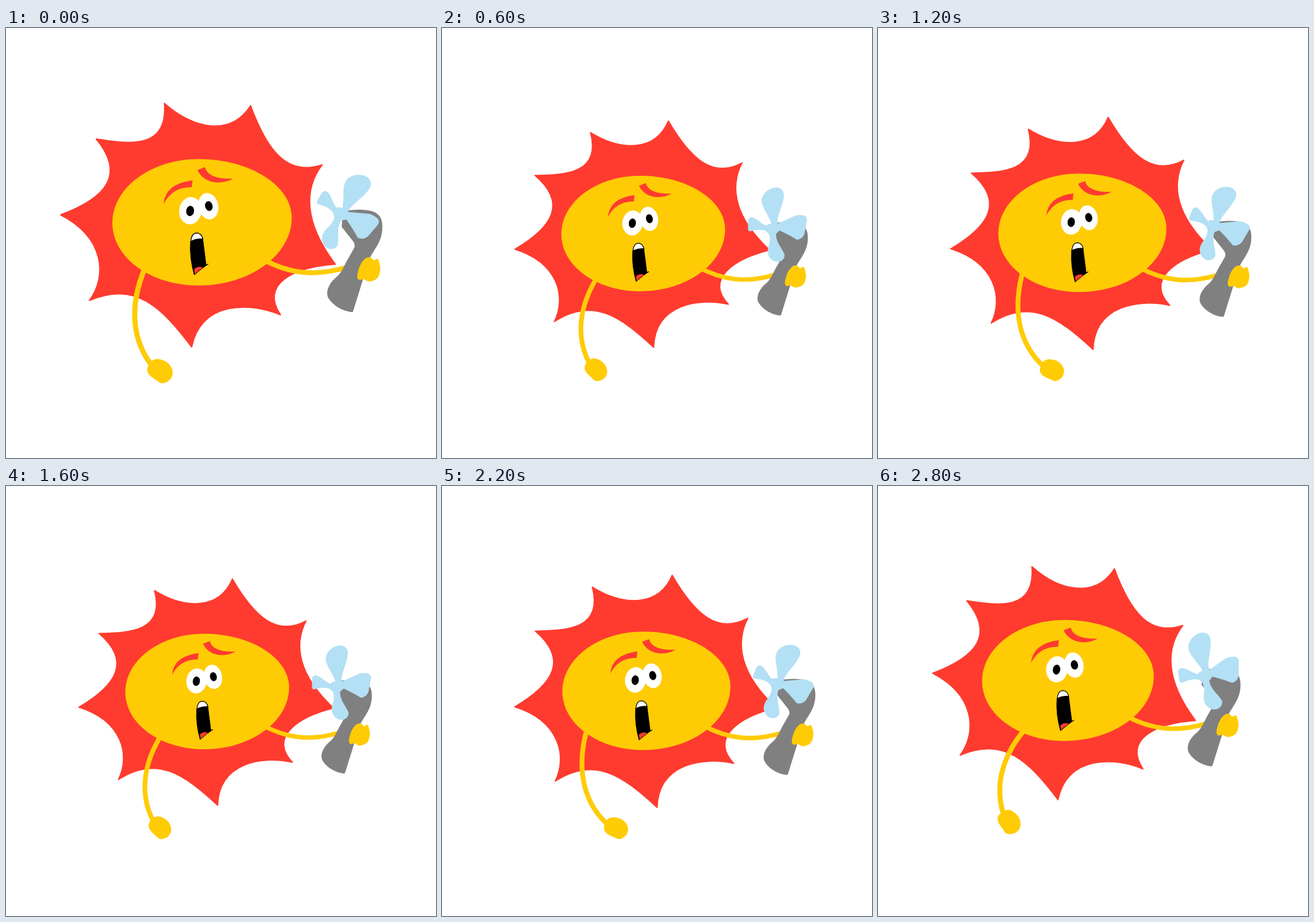
Animation of 748 by 748 pixels, one loop 3010 ms. Source, as an HTML page with a canvas:

```html
<!DOCTYPE html>
<html lang="en">
<head>
<meta charset="utf-8">
<title>Hot sun with a fan</title>
<style>
  html, body { margin: 0; width: 100%; height: 100%; overflow: hidden; background: #fff; }
  canvas { display: block; width: 100vw; height: 100vh; object-fit: contain; }
</style>
</head>
<body>
<canvas id="stage" width="748" height="748"></canvas>
<script>
const ctx = document.getElementById('stage').getContext('2d');
const LOOP = 3010, STEP = 200;
const RED = '#ff3b2f', YELLOW = '#ffcb05', GREY = '#808080', BLUE = '#b3e0f5';
const CENTER = [341, 338], ARM_PIVOT = [255, 500], FAN_PIVOT = [595, 316];

// x, y and size of the whole figure, then turns of rays and left arm in degrees
const poses = [
  { x: 341, y: 338, size: 1, rays: 0, arm: 0 },
  { x: 355.5, y: 356.2, size: 0.937, rays: -10, arm: -10 },
  { x: 351.6, y: 356.4, size: 0.921, rays: -10, arm: 0 },
  { x: 350, y: 357.5, size: 0.913, rays: -10, arm: 10 },
  { x: 330.4, y: 338.2, size: 0.957, rays: 0, arm: 20 }
];

const rays = new Path2D(`M275.5 131 C325 175 390 190 425.5 135
  C455 215 490 258 550 238 C518 280 518 338 573 411
  C500 416 442 445 477.5 499 C425 477 340 474 323 555
  C270 485 225 440 145 474 C176 432 172 365 95 325
  C175 295 208 255 157 193 C215 202 282 212 275.5 131 Z`);
const face = new Path2D(`M185 339 C185 278 252 228 335 228 C424 228 497 274 497 330
  C497 395 424 448 335 448 C252 448 185 400 185 339 Z`);
const brows = new Path2D(`M274 306 Q277 271 324.5 265 L323 277 Q290 276 274 306 Z
  M333 247 L346 242 C350 257 368 263 395 262 C372 275 343 269 333 247 Z`);
const mouth = new Path2D(`M321 371 Q331 365 342 365 L348 412 L352 410.5
  Q342 417 327.5 429.5 Q319 400 321 371 Z`);
const tooth = new Path2D('M321.5 371 Q323 356.5 332 356.5 Q340 357 342.5 367 Q331 366 321.5 371 Z');
const tongue = new Path2D('M327 420 Q334 413 342.5 417 Q335 422 328.5 428 Z');
const leftArm = new Path2D('M249 402 C215 470 215 535 252 585');
const rightArm = new Path2D('M446 402 C490 426 535 434 594 416');
const handle = new Path2D(`M586 319 C605 315 625 315 638 319 C652 324 656 335 654.5 352
  C652 375 640 385 632 402 L604 492 Q603.5 495 600 494 C585 492 569 483 561 470
  C555 459 562 444 574 434 C584 426 588 414 593 405 L606 382 Q608 376 603 370
  L584 346 Z`);
const blades = new Path2D(`M585 314 C589 295 584 276 592 265 C600 255 615 253 626 258
  C636 263 637 273 632 280 C620 297 601 306 595 320
  L629 323 Q636 323 646 331 Q651 336 647 342 L630 362 Q622 369 612 365
  Q604 350 592 333 L583 335
  C574 350 580 365 577 378 C572 387 561 386 555 380 C546 368 550 358 557 350
  C565 343 569 338 571 329 L569 321
  C562 312 552 309 542 306 Q539 304 542 299 L550 286 Q555 281 560 286
  C567 293 568 305 575 313 Q580 310 585 314 Z`);
const leftHand = blob([[246, 592], [254, 579], [266, 576], [282, 583], [290, 598],
  [285, 612], [272, 618], [262, 613], [249, 603]]);
const rightHand = blob([[611, 431], [616, 413], [625, 401], [634, 399], [640, 404],
  [647, 402], [651, 419], [646, 435], [632, 441], [622, 437], [614, 438]]);

// closed smooth curve through the points
function blob(pts) {
  const path = new Path2D(), n = pts.length;
  const at = i => pts[(i + n) % n];
  path.moveTo(...pts[0]);
  for (let i = 0; i < n; i++) {
    const [a, b, c, d] = [at(i - 1), at(i), at(i + 1), at(i + 2)];
    path.bezierCurveTo(b[0] + (c[0] - a[0]) / 6, b[1] + (c[1] - a[1]) / 6,
      c[0] - (d[0] - b[0]) / 6, c[1] - (d[1] - b[1]) / 6, c[0], c[1]);
  }
  path.closePath();
  return path;
}

function fill(path, color) {
  ctx.fillStyle = color;
  ctx.fill(path);
}

function stroke(path, color, width) {
  ctx.strokeStyle = color;
  ctx.lineWidth = width;
  ctx.stroke(path);
}

function oval(x, y, rx, ry, tilt, color) {
  ctx.beginPath();
  ctx.ellipse(x, y, rx, ry, tilt * Math.PI / 180, 0, Math.PI * 2);
  ctx.fillStyle = color;
  ctx.fill();
}

function turned([x, y], degrees, paint) {
  ctx.save();
  ctx.translate(x, y);
  ctx.rotate(degrees * Math.PI / 180);
  ctx.translate(-x, -y);
  paint();
  ctx.restore();
}

function drawFace() {
  fill(face, YELLOW);
  fill(brows, RED);
  oval(320.8, 317.8, 19.5, 23.8, 8, '#fff');
  oval(352, 310, 17.3, 23.2, -12, '#fff');
  oval(320.3, 318.3, 6.8, 9, 8, '#000');
  oval(352.8, 309.8, 6.5, 8.6, -14, '#000');
  fill(mouth, '#000');
  stroke(mouth, '#000', 1);
  fill(tooth, '#fff');
  stroke(tooth, '#000', 1.4);
  fill(tongue, RED);
}

function draw(index) {
  const pose = poses[index];
  ctx.setTransform(1, 0, 0, 1, 0, 0);
  ctx.fillStyle = '#fff';
  ctx.fillRect(0, 0, 748, 748);
  ctx.lineJoin = 'round';
  ctx.translate(pose.x, pose.y);
  ctx.scale(pose.size, pose.size);
  ctx.translate(-CENTER[0], -CENTER[1]);

  turned(CENTER, pose.rays, () => {
    fill(rays, RED);
    stroke(rays, RED, 2);
  });
  drawFace();
  turned(ARM_PIVOT, pose.arm, () => {
    stroke(leftArm, YELLOW, 9);
    fill(leftHand, YELLOW);
  });
  stroke(rightArm, YELLOW, 8.5);
  fill(handle, GREY);
  turned(FAN_PIVOT, -10 * index, () => fill(blades, BLUE));
  fill(rightHand, YELLOW);
}

function tick() {
  const step = Math.min(14, Math.floor(performance.now() % LOOP / STEP));
  draw(step % poses.length);
  requestAnimationFrame(tick);
}
tick();
</script>
</body>
</html>
```
